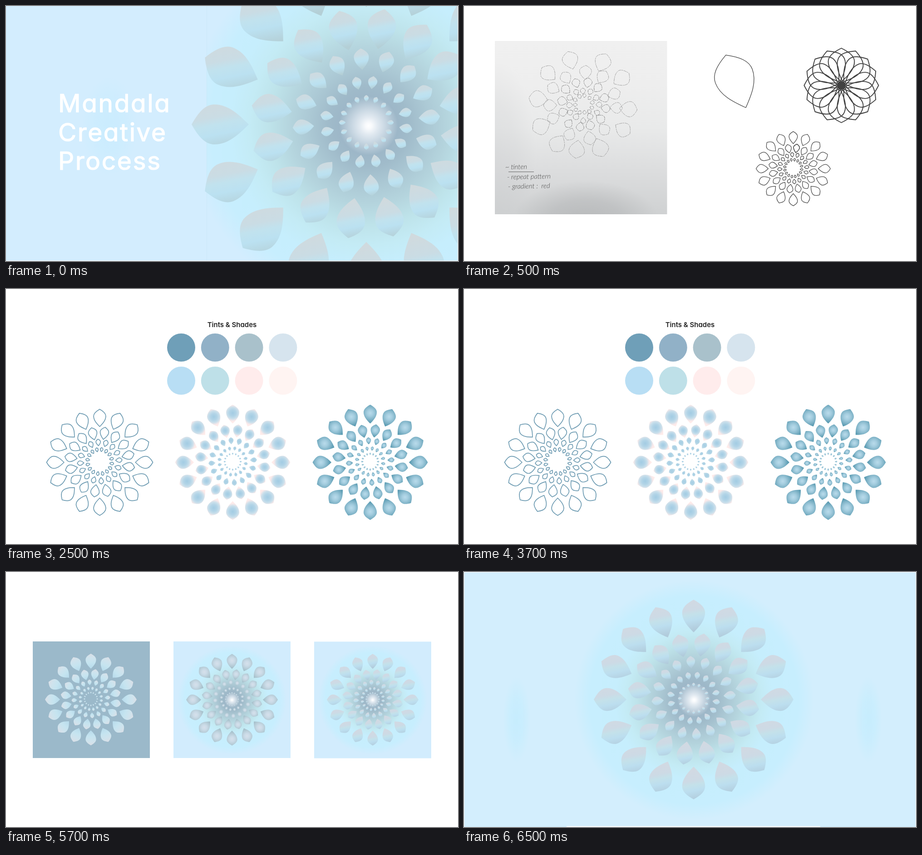
Write an HTML page with a canvas that moves like this. It is 996 px wide and 562 px high and loops after 8 s.

```html
<!DOCTYPE html>
<html lang="en">
<head>
<meta charset="utf-8">
<title>Mandala Creative Process</title>
<style>
  html, body { margin: 0; width: 100%; height: 100%; overflow: hidden; background: #fff; }
  canvas, svg { position: absolute; left: 0; top: 0; width: 996px; height: 562px; }
  text { font-family: Inter, "Open Sans", sans-serif; font-feature-settings: "cv11"; }
  #title { fill: #fff; stroke: #fff; stroke-width: 1.2; stroke-linejoin: round; font-size: 55px; font-weight: 400; letter-spacing: 2.6px; }
  #label { fill: #222; font-size: 15px; font-weight: 600; text-anchor: middle; }
</style>
</head>
<body>
<canvas id="stage" width="996" height="562"></canvas>
<svg viewBox="0 0 996 562">
  <g id="title">
    <text x="115" y="234">Mandala</text>
    <text x="115" y="297.5">Creative</text>
    <text x="115" y="361">Process</text>
  </g>
  <text id="label" x="498" y="84">Tints &amp; Shades</text>
</svg>
<script>
const g = document.getElementById('stage').getContext('2d');
const title = document.getElementById('title');
const label = document.getElementById('label');
const TAU = Math.PI * 2, RAD = Math.PI / 180;

// inner radius, outer radius, turn in degrees, vertical shift
const RINGS = [
  [148, 220, 0, 0],
  [95, 146, 9, -1],
  [66, 93, -4.4, -3],
  [42, 58.5, 9, -3],
  [26, 34.5, 0, -2.5]
];
const GLOW = [
  [0, '#ffffff'], [4, '#f8fafc'], [11, '#e2eaf1'], [20, '#cbd9e4'], [29, '#b3c7d5'], [37, '#9db7c8'],
  [51, '#a0bbca'], [74, '#abc8d4'], [100, '#b5d5de'], [125, '#bee3ea'],
  [150, '#c4ebf5'], [175, '#c6eefd']
];
const SHEEN = ['#d2d9e2', '#cddae5', '#c4e1ea', '#bcdeef', '#b1cbdb'];
const SHEEN_STOPS = [0, 0.36, 0.5, 0.68, 1];

function stops(grad, colors, at) {
  colors.forEach((c, i) => grad.addColorStop(at ? at[i] : i / (colors.length - 1), c));
  return grad;
}

function rect(x, y, w, h, fill) {
  g.fillStyle = fill;
  g.fillRect(x, y, w, h);
}

function disc(x, y, r, fill) {
  g.fillStyle = fill;
  g.beginPath();
  g.arc(x, y, r, 0, TAU);
  g.fill();
}

function clipped(x, y, w, h, draw) {
  g.save();
  g.beginPath();
  g.rect(x, y, w, h);
  g.clip();
  draw();
  g.restore();
}

// Petal path pointing outwards at angle a, clockwise from the top
function petal(x, y, a, r0, r1, wide = 0.35) {
  const len = r1 - r0, w = wide * len;
  const v = u => -(r0 + u * len);
  g.save();
  g.translate(x, y);
  g.rotate(a);
  g.beginPath();
  g.moveTo(0, v(0));
  g.bezierCurveTo(w * 0.48, v(0.17), w, v(0.36), w, v(0.6));
  g.bezierCurveTo(w, v(0.76), w * 0.62, v(0.88), 0, v(1));
  g.bezierCurveTo(-w * 0.62, v(0.88), -w, v(0.76), -w, v(0.6));
  g.bezierCurveTo(-w, v(0.36), -w * 0.48, v(0.17), 0, v(0));
  g.closePath();
  g.restore();
}

function mandala(x, y, s, paint, rings = RINGS) {
  rings.forEach(([r0, r1, turn, dy], ring) => {
    for (let k = 0; k < 16; k++) {
      const a = (k * 22.5 + turn) * RAD, cy = y + dy * s;
      const mid = s * (r0 + (r1 - r0) * 0.56);
      petal(x, cy, a, r0 * s, r1 * s);
      paint(x + Math.sin(a) * mid, cy - Math.cos(a) * mid, (r1 - r0) * s, a, ring);
    }
  });
}

function outline(color, width) {
  return () => {
    g.strokeStyle = color;
    g.lineWidth = width;
    g.stroke();
  };
}

function radial(colors, at) {
  return (x, y, len) => {
    g.fillStyle = stops(g.createRadialGradient(x, y, 0, x, y, len * 0.5), colors, at);
    g.fill();
  };
}

function sheen(colors) {
  return (x, y, len) => {
    const h = len * 0.47, dx = h * 0.2;
    g.fillStyle = stops(g.createLinearGradient(x - dx, y - h, x + dx, y + h), colors, SHEEN_STOPS);
    g.fill();
  };
}

function along(colors) {
  return (x, y, len, a) => {
    const dx = Math.sin(a) * len / 2, dy = -Math.cos(a) * len / 2;
    g.fillStyle = stops(g.createLinearGradient(x - dx, y - dy, x + dx, y + dy), colors);
    g.fill();
  };
}

function glow(x, y, s, edge, back) {
  const grad = g.createRadialGradient(x, y, 0, x, y, edge);
  GLOW.forEach(([r, c]) => grad.addColorStop(r * s / edge, c));
  grad.addColorStop(0.87, '#c7eefe');
  grad.addColorStop(1, back);
  disc(x, y, edge, grad);
}

function haze(x, y, rx, ry, rgb, alpha) {
  g.save();
  g.translate(x, y);
  g.scale(rx, ry);
  const grad = g.createRadialGradient(0, 0, 0, 0, 0, 1);
  disc(0, 0, 1, stops(grad, [`rgba(${rgb},${alpha})`, `rgba(${rgb},${alpha * 0.7})`, `rgba(${rgb},0)`]));
  g.restore();
}

function cover() {
  const back = '#d3edfe';
  rect(0, 0, 995, 561, back);
  haze(228, 265, 62, 110, '199,236,254', 0.7);
  clipped(442, 0, 553, 561, () => glow(799, 264, 1.75, 400, back));
  rect(442, 0, 1, 561, 'rgba(190,225,240,.35)');
  const silver = sheen(['#d0dade', '#cadce4', '#c1e2ee', '#bbe1f1', '#b4cfd6']);
  clipped(0, 0, 995, 561, () => mandala(794, 261, 1.75, silver));
}

function pencil() {
  let seed = 7;
  const rnd = () => (seed = seed * 16807 % 2147483647) / 2147483647 - 0.5;
  const even = (n, from) => Array.from({ length: n }, (_, i) => from + i * 360 / n);
  const rings = [
    [101, 40, [-46, -15, 25, 55, 94, 121, 158, 187, 212, 243, 278]],
    [73, 29, [-32, 4, 34, 72, 95, 138, 170, 205, 247, 270, 300]],
    [49, 21, even(12, 10)],
    [32, 14, even(12, 0)],
    [18, 9, even(11, 8)]
  ];
  g.lineWidth = 1;
  g.setLineDash([7, 1.5, 3, 1]);
  for (const [r, size, angles] of rings) {
    g.strokeStyle = r > 60 ? '#a0a0a0' : '#858585';
    for (const deg of angles) {
      const a = (deg + rnd() * 4) * RAD, mid = r + rnd() * 6, len = size * (1 + rnd() * 0.15);
      petal(263, 218, a, mid - len / 2, mid + len / 2, 0.43);
      g.stroke();
    }
  }
  g.setLineDash([]);
}

function note(str, x, y) {
  g.save();
  g.translate(x, y);
  g.rotate(-0.02);
  g.fillText(str, 0, 0);
  g.restore();
}

function sketch() {
  const paper = g.createLinearGradient(0, 77, 0, 459);
  rect(68, 77, 379.5, 382, stops(paper, ['#f0f0f0', '#eeeeee', '#e9eaea', '#dcddde', '#cfd1d2']));
  clipped(68, 77, 379.5, 382, () => {
    haze(268, 470, 160, 85, '150,152,154', 0.4);
    haze(68, 320, 90, 200, '190,192,195', 0.25);
  });
  pencil();
  g.fillStyle = '#444';
  g.font = 'italic 300 15px Lato, sans-serif';
  note('~ tinten', 91, 360);
  note('- repeat pattern', 95, 382);
  note('- gradient :  red', 97, 403);
  rect(98, 365, 56, 1, '#666');

  petal(621, 224, -20.8 * RAD, 0, 124);
  outline('#444', 1.3)();

  for (let k = 0; k < 16; k++) {
    petal(831.5, 175, k * 22.5 * RAD, 8, 82, 0.39);
    outline('#414141', 1.9)();
  }
  disc(831.5, 175, 9, '#414141');

  mandala(725.5, 358.5, 0.372, outline('#4c4c4c', 1.3), RINGS.slice(0, 4));
  petal(725.5, 358.1, 9 * RAD, 35.3, 54.3);
  outline('#444', 1.3)();
}

function palette() {
  const tints = ['#6f9fb8', '#91b1c7', '#a9c1cb', '#d6e4ee', '#b8def4', '#bee0e8', '#ffecec', '#fff4f2'];
  tints.forEach((c, i) => disc(386 + (i % 4) * 74.8, i < 4 ? 129 : 202, 31, c));
  mandala(206.5, 382, 0.532, outline('#6d9bb2', 1.7), RINGS.slice(0, 4));
  const blush = radial(['#a3cce3', '#b2d4e7', '#c9dfeb', '#fbeaea', '#ffecea'], [0, 0.35, 0.6, 0.85, 1]);
  const bud = radial(['#a5cee4', '#b1d4e6', '#c8e0ea']);
  mandala(499.5, 382, 0.577, (x, y, len, a, ring) => (ring < 2 ? blush : bud)(x, y, len));
  mandala(802.5, 382, 0.577, radial(['#b9dbeb', '#a4cddf', '#82b5c9', '#5a9bb2']));
}

function squares() {
  const s = 0.459, back = '#d2ecfd';
  rect(59, 153, 258, 257, '#9bb9ca');
  mandala(187, 281, s, along(['#b9dcec', '#c5e4f0', '#cfe3ed', '#dcdee5']));
  rect(369, 153, 258, 257, back);
  glow(498, 282, s, 120, back);
  mandala(498, 281.5, s, radial(['#d6e0eb', '#cbdbe7', '#b9ced9', '#a5c0cb']));
  rect(679, 153.5, 258, 257, back);
  glow(808, 282, s, 120, back);
  mandala(808, 281.5, s, sheen(SHEEN));
}

function finale() {
  const back = '#d3eefd';
  rect(1, 1, 994, 561, back);
  haze(116, 325, 30, 95, '194,237,254', 0.75);
  haze(891, 325, 30, 95, '194,237,254', 0.75);
  glow(507, 282, 1, 264, back);
  mandala(506, 281, 1, sheen(SHEEN));
  rect(226, 560, 559, 2, '#fff');
}

const SCENES = [[0, cover], [500, sketch], [2500, palette], [4500, squares], [6500, finale]];
const start = performance.now();
let shown = null;

function frame() {
  const t = Math.max(0, performance.now() - start) % 8000;
  const scene = SCENES.filter(([from]) => t >= from).pop()[1];
  if (scene !== shown) {
    shown = scene;
    rect(0, 0, 996, 562, '#fff');
    scene();
    title.style.display = scene === cover ? '' : 'none';
    label.style.display = scene === palette ? '' : 'none';
  }
  requestAnimationFrame(frame);
}
frame();
</script>
</body>
</html>
```
